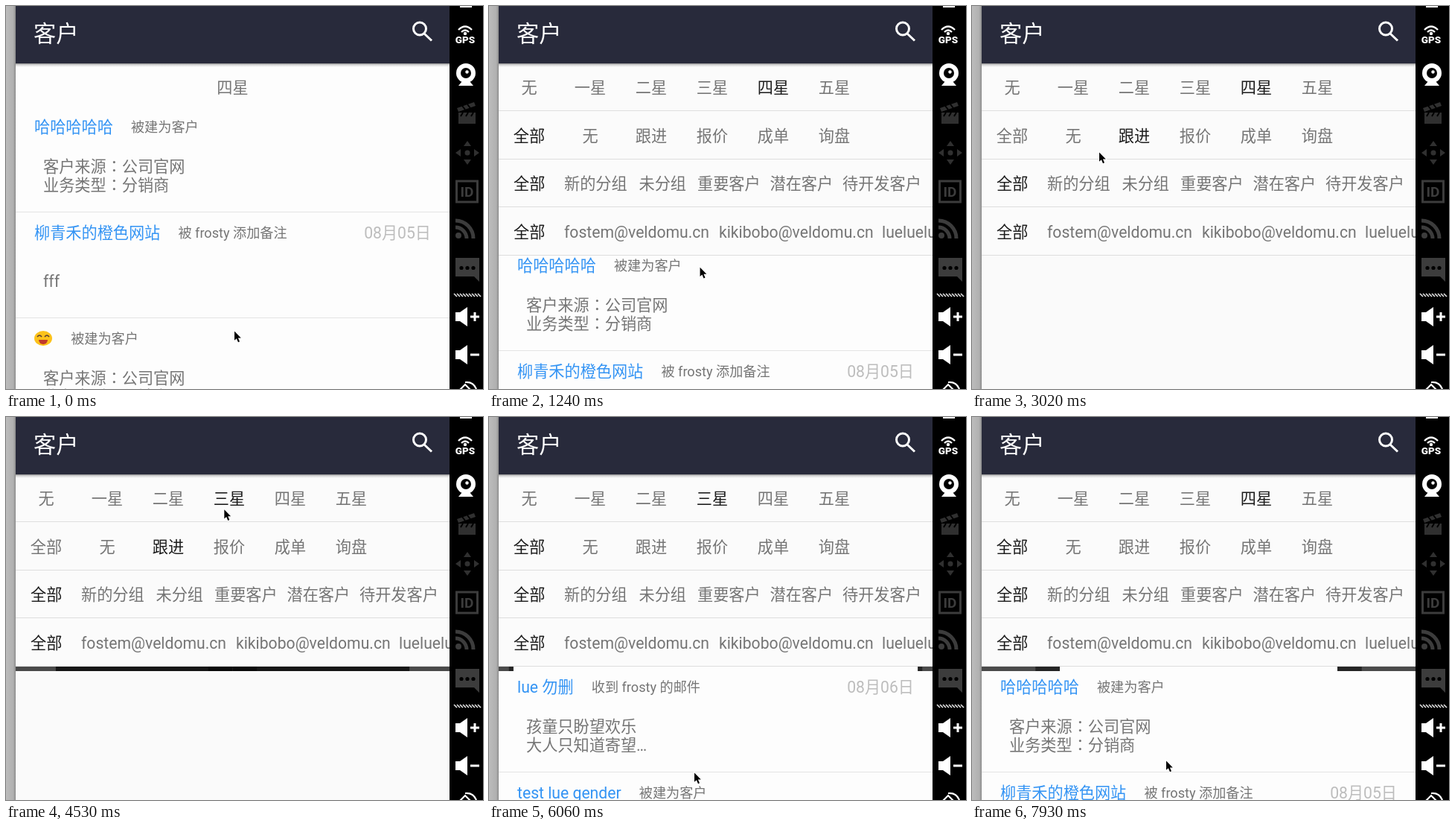
Write an HTML page with a canvas that moves like this. It is 641 px wide and 514 px high and loops after 8000 ms.

```html
<!DOCTYPE html>
<html lang="zh-CN">
<meta charset="utf-8">
<style>
html, body { margin: 0; width: 641px; height: 514px; overflow: hidden; background: #000 }
canvas { display: block }
</style>
<canvas width="641" height="514"></canvas>
<script>
const c = document.querySelector('canvas').getContext('2d');
const LOOP = 8000, LEFT = 13, RIGHT = 596, MID = 304.5, PANEL_END = 334, ITEM = 142;
const SANS = 'Roboto, "Noto Sans CJK SC", sans-serif';
const BODY = 21.175, SMALL = 18.15, TITLE = 30.25;
const GREY = '#757575', DARK = '#1c1c1c', BLUE = '#3494f4', DIM = '#3c3c3c', FAINT = '#303030';

const OPEN = 90, CLICK_FOLLOW = 1783, CLICK_THREE = 4340, CLICK_ALL = 5399,
  LOADED_THREE = 5421, CLICK_FOUR = 7417, LOADED_FOUR = 7477;
// [start, finish] of each refresh bar
const BARS = [[CLICK_FOLLOW, 2080], [4364, 4600], [CLICK_ALL, LOADED_THREE], [CLICK_FOUR, LOADED_FOUR]];
const BAR_SPEED = 1.3;
// time, x, y of the pointer tip
const POINTER = [[0, 306, 435], [90, 306, 435], [440, 309, 411], [1000, 309, 411], [1720, 204, 166],
  [1950, 203, 157], [2700, 174, 192], [3020, 170, 195], [3460, 172, 193], [4260, 293, 122],
  [4700, 292, 123], [5220, 58, 170], [5400, 58, 174], [6060, 275, 476], [6160, 275, 474],
  [6860, 226, 118], [7210, 370, 110], [7470, 370, 110], [7930, 260, 460], [8000, 260, 460]];

const STARS = ['无', '一星', '二星', '三星', '四星', '五星'];
const STAGES = ['全部', '无', '跟进', '报价', '成单', '询盘'];
const GROUPS = [['全部', 33], ['新的分组', 101], ['未分组', 201.5], ['重要客户', 280], ['潜在客户', 377.5], ['待开发客户', 475]];
const OWNERS = [['全部', 33], ['fostem@veldomu.cn', 101], ['kikibobo@veldomu.cn', 309], ['lueluelue', 528]];
const SOURCE = ['客户来源：公司官网', '业务类型：分销商'];
const FOUR_STAR = [
  { name: '哈哈哈哈哈', note: '被建为客户', lines: SOURCE },
  { name: '柳青禾的橙色网站', note: '被 frosty 添加备注', date: '08月05日', lines: ['fff'] },
  { note: '被建为客户', lines: SOURCE }];
const THREE_STAR = [
  { name: 'lue 勿删', note: '收到 frosty 的邮件', date: '08月06日', lines: ['孩童只盼望欢乐', '大人只知道寄望…'] },
  { name: 'test lue gender', note: '被建为客户', lines: [] }];

const wave = p => (1 - Math.cos(Math.PI * Math.min(1, Math.max(0, p)))) / 2;

function rect(x, y, w, h, color) {
  c.fillStyle = color;
  c.fillRect(x, y, w, h);
}
function disc(x, y, r, color) {
  c.fillStyle = color;
  c.beginPath();
  c.arc(x, y, r, 0, 7);
  c.fill();
}
function poly(points, color) {
  c.fillStyle = color;
  c.beginPath();
  for (let i = 0; i < points.length; i += 2) c.lineTo(points[i], points[i + 1]);
  c.closePath();
  c.fill();
}
function stroke(path, color, width) {
  c.strokeStyle = color;
  c.lineWidth = width;
  c.stroke(new Path2D(path));
}
// y is the middle of a CJK glyph; baselines sit on whole pixels
function text(s, x, y, { size = BODY, color = GREY, align = 'left', weight = 400, font = SANS } = {}) {
  c.font = `${weight} ${size}px ${font}`;
  c.fillStyle = color;
  c.textAlign = align;
  c.fillText(s, x, Math.floor(y + size * .38));
  return c.measureText(s).width;
}

function smiley(x, y) {
  c.fillStyle = '#fcc21b';
  c.beginPath();
  c.ellipse(x, y, 12, 10, 0, 0, 7);
  c.fill();
  stroke(`M${x - 8} ${y - 2}q3 -4 6 0M${x + 2} ${y - 2}q3 -4 6 0`, '#5d4037', 1.6);
  c.fillStyle = '#c0392b';
  c.beginPath();
  c.arc(x, y + 2, 6, 0, Math.PI);
  c.fill();
}

function drawItem(item, top) {
  const y = top + 28;
  let width = 25;
  if (item.name) width = text(item.name, 38, y, { color: BLUE });
  else smiley(50, y);
  text(item.note, 38 + width + 24.2, y + .2, { size: SMALL });
  if (item.date) text(item.date, 571, y, { color: '#bdbdbd', align: 'right' });
  item.lines.forEach((line, i) => {
    const lineY = top + 93.5 + (i - (item.lines.length - 1) / 2) * 25;
    const [label, value] = line.split('：');
    const x = 50 + text(label, 50, lineY);
    if (value) text(value, x + text('：', x, lineY, { font: '"Noto Sans CJK TC", sans-serif' }), lineY);
  });
  rect(LEFT, top + ITEM, RIGHT - LEFT, 1, '#e4e4e4');
}

function drawList(t) {
  let items = [], scroll = 0;
  if (t < CLICK_FOLLOW) {
    items = FOUR_STAR;
    const p = Math.min(1, Math.max(0, (t - 60) / 340));
    scroll = t < OPEN ? 200 : 14 + Math.round(186 * (1 - p) ** 3);
  } else if (t >= LOADED_THREE && t < CLICK_FOUR) items = THREE_STAR;
  else if (t >= LOADED_FOUR) items = FOUR_STAR;
  if (items.length) rect(LEFT, 77, RIGHT - LEFT, 437, '#fdfdfd');
  items.forEach((item, i) => drawItem(item, PANEL_END - scroll + i * ITEM));
}

function drawPanel(t) {
  if (t < OPEN) {
    rect(LEFT, 77, RIGHT - LEFT, 57, '#fdfdfd');
    text('四星', MID, 109, { align: 'center' });
    return;
  }
  const star = t >= CLICK_THREE && t < CLICK_FOUR ? 3 : 4;
  const stage = t >= CLICK_FOLLOW && t < CLICK_ALL ? 2 : 0;
  const look = on => on ? { color: DARK, weight: 500 } : {};
  rect(LEFT, 77, RIGHT - LEFT, PANEL_END - 77, '#fbfbfb');
  [[STARS, star, 109], [STAGES, stage, 174]].forEach(([labels, chosen, y]) =>
    labels.forEach((s, i) => text(s, 54 + 82 * i, y, { align: 'center', ...look(i == chosen) })));
  [[GROUPS, 238], [OWNERS, 303]].forEach(([labels, y]) =>
    labels.forEach(([s, x], i) => text(s, x, y, look(!i))));
  for (const y of [140, 205, 269, PANEL_END]) rect(LEFT, y, RIGHT - LEFT, 1, '#dedede');
}

// Translucent bands grow from the middle, then a gap opens there
function drawBar(t, [start, finish]) {
  const raw = (t - start) * BAR_SPEED / 20, ending = (t - finish) * BAR_SPEED / 1000;
  if (raw < 0 || ending >= 1) return;
  const full = (RIGHT - LEFT) / 2, gap = full * wave(ending);
  const band = (alpha, half) => {
    if (half <= gap) return;
    const color = `rgba(0,0,0,${alpha})`;
    rect(MID - half, 335, half - gap, 6, color);
    rect(MID + gap, 335, half - gap, 6, color);
  };
  band(.7, full);
  [.7, .5, .3, .1].forEach((alpha, i) => {
    const from = 25 * (i - 1);
    if (raw >= from && raw <= from + 50) band(alpha, full * wave((raw - from) / 50));
  });
}

function drawHeader() {
  rect(LEFT, 0, RIGHT - LEFT, 77, '#282a3b');
  const shade = c.createLinearGradient(0, 77, 0, 82);
  shade.addColorStop(0, 'rgba(0,0,0,.45)');
  shade.addColorStop(.4, 'rgba(0,0,0,.15)');
  shade.addColorStop(1, 'rgba(0,0,0,0)');
  rect(LEFT, 77, RIGHT - LEFT, 5, shade);
  text('客户', 37, 36.6, { size: TITLE, color: '#fff' });
  stroke('M564.5 30.5a8.5 8.5 0 1 1 -17 0a8.5 8.5 0 1 1 17 0M562 37l10 9.5', '#fff', 3);
}

function drawEdge() {
  const edge = c.createLinearGradient(0, 0, LEFT, 0);
  edge.addColorStop(0, '#bcbcbc');
  edge.addColorStop(.75, '#b0b0b0');
  edge.addColorStop(1, '#8c8c8c');
  rect(0, 0, LEFT, 514, edge);
}

function drawToolbar() {
  const W = '#fff';
  rect(RIGHT, 0, 45, 514, '#000');
  rect(610, 0, 16, 2, W);
  disc(617, 37, 2.2, W);
  stroke('M612 35q5 -5 10 0M608 32q9 -9 18 0', W, 2.4);
  text('GPS', 617, 45.5, { size: 13.5, color: W, align: 'center', weight: 900 });
  disc(618, 90, 13, W);
  disc(618, 90, 7, '#000');
  disc(619.5, 88.5, 2.2, W);
  poly([613, 101, 623, 101, 628, 107, 608, 107], W);

  rect(608, 143, 23, 15, FAINT);
  poly([606, 137, 629, 129, 631, 134, 608, 142], FAINT);
  stroke('M613 134l4 5M620 132l4 5M614 143l-3 5M621 143l-3 5M628 143l-3 5', '#000', 2);
  disc(620, 197, 3.5, FAINT);
  for (let i = 0; i < 4; i++) {
    c.save();
    c.translate(620, 197);
    c.rotate(i * Math.PI / 2);
    poly([0, -16, 5, -9, -5, -9], FAINT);
    c.restore();
  }
  stroke('M605.5 235h28v28h-28z', DIM, 3);
  text('ID', 619.5, 249, { size: 19, color: DIM, align: 'center', weight: 700 });
  disc(608, 308, 4, DIM);
  stroke('M604 297a15 15 0 0 1 15 15M604 288a24 24 0 0 1 24 24', DIM, 5);
  poly([604, 338, 636, 338, 636, 370, 629, 363, 604, 363], DIM);
  for (const x of [612, 620, 628]) disc(x, 351.5, 2.6, '#000');

  for (let x = 602; x < 637; x += 4) stroke(`M${x} 386l4 4`, '#ddd', 1.7);
  for (const y of [417, 468]) {
    poly([604, y - 6, 610, y - 6, 620, y - 13, 620, y + 13, 610, y + 6, 604, y + 6], W);
    rect(624, y - 1.5, 12, 3, W);
  }
  rect(628.5, 411, 3, 12, W);
  stroke('M608 517l9 -9l14 14M617 505q11 -1 15 9', W, 2.2);
}

function drawPointer(t) {
  const i = POINTER.findIndex(k => k[0] > t), [t0, x0, y0] = POINTER[i - 1], [t1, x1, y1] = POINTER[i];
  const p = wave((t - t0) / (t1 - t0));
  c.save();
  c.translate(x0 + (x1 - x0) * p, y0 + (y1 - y0) * p);
  const arrow = 'M1 1.5v12.3l2.8 -2.6l2.2 5l2 -.9l-2.1 -4.8h3.9z';
  stroke(arrow, '#fff', 2);
  c.fillStyle = '#000';
  c.fill(new Path2D(arrow));
  c.restore();
}

function draw(now) {
  const t = now % LOOP;
  rect(0, 0, 641, 514, '#fafafa');
  drawList(t);
  drawPanel(t);
  BARS.forEach(bar => drawBar(t, bar));
  drawHeader();
  drawEdge();
  drawToolbar();
  drawPointer(t);
  requestAnimationFrame(draw);
}
requestAnimationFrame(draw);
</script>
</html>
```
